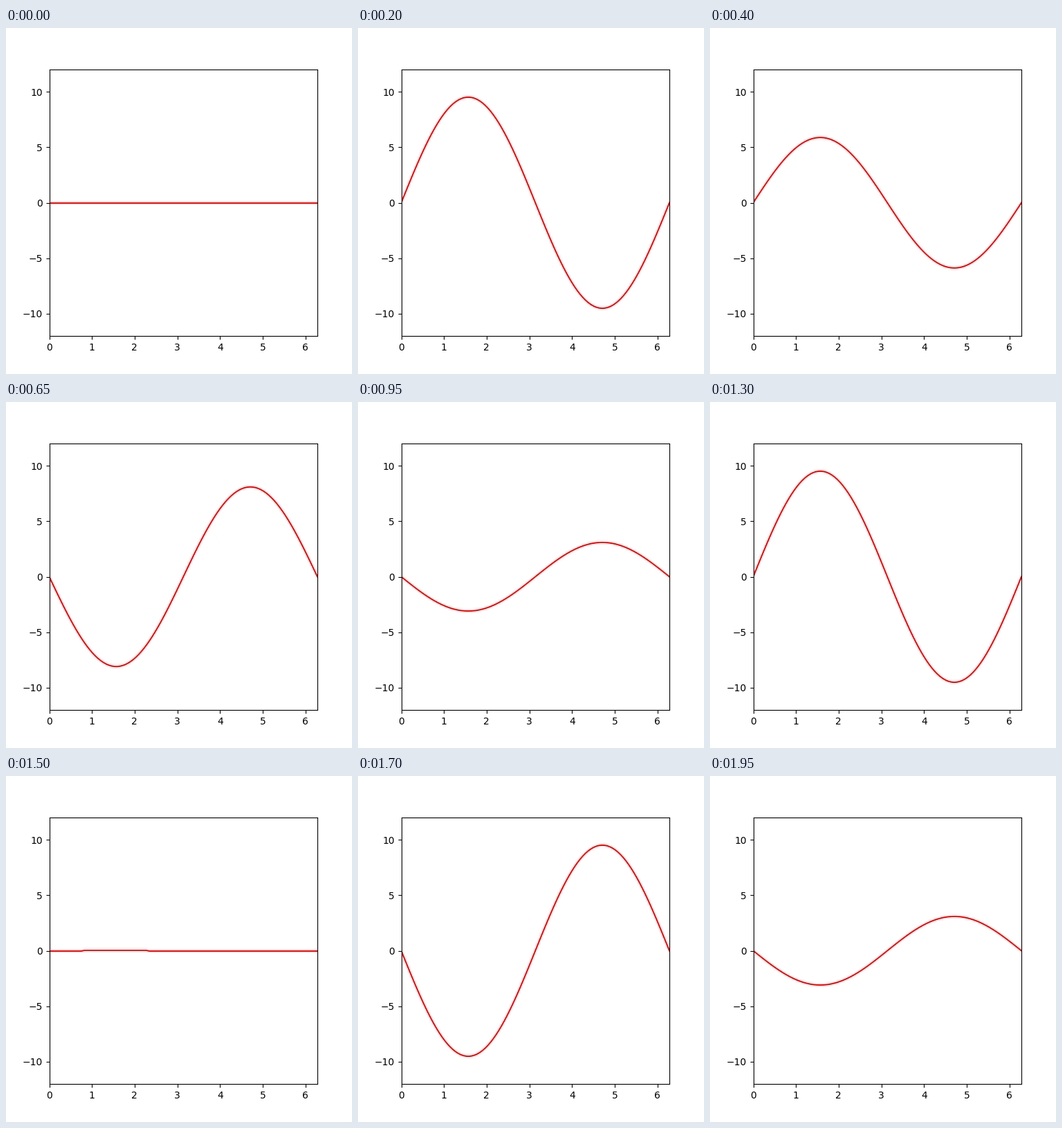
Recreate the animation shown at these times as a matplotlib script. Size 500x500 px, loop 2 s.

```python
import matplotlib.pyplot as plt
import numpy as np
from matplotlib.animation import FuncAnimation

FRAMES = 40
INTERVAL = 50
PERIOD = 20
AMPLITUDE = 10

fig, ax = plt.subplots(figsize=(5, 5), dpi=100)
ax.set_xlim(0, 2 * np.pi)
ax.set_ylim(-12, 12)

x = np.linspace(0, 2 * np.pi, 100)
wave = np.sin(x)
line, = ax.plot(x, 0 * x, color="red", lw=1.5)


def update(i):
    """Standing wave whose height swings through one sine per period."""
    height = AMPLITUDE * np.sin(2 * np.pi * (i % PERIOD) / PERIOD)
    line.set_ydata(height * wave)
    return line,


anim = FuncAnimation(fig, update, frames=FRAMES, interval=INTERVAL,
                     repeat=True, repeat_delay=0)
plt.show()
```
